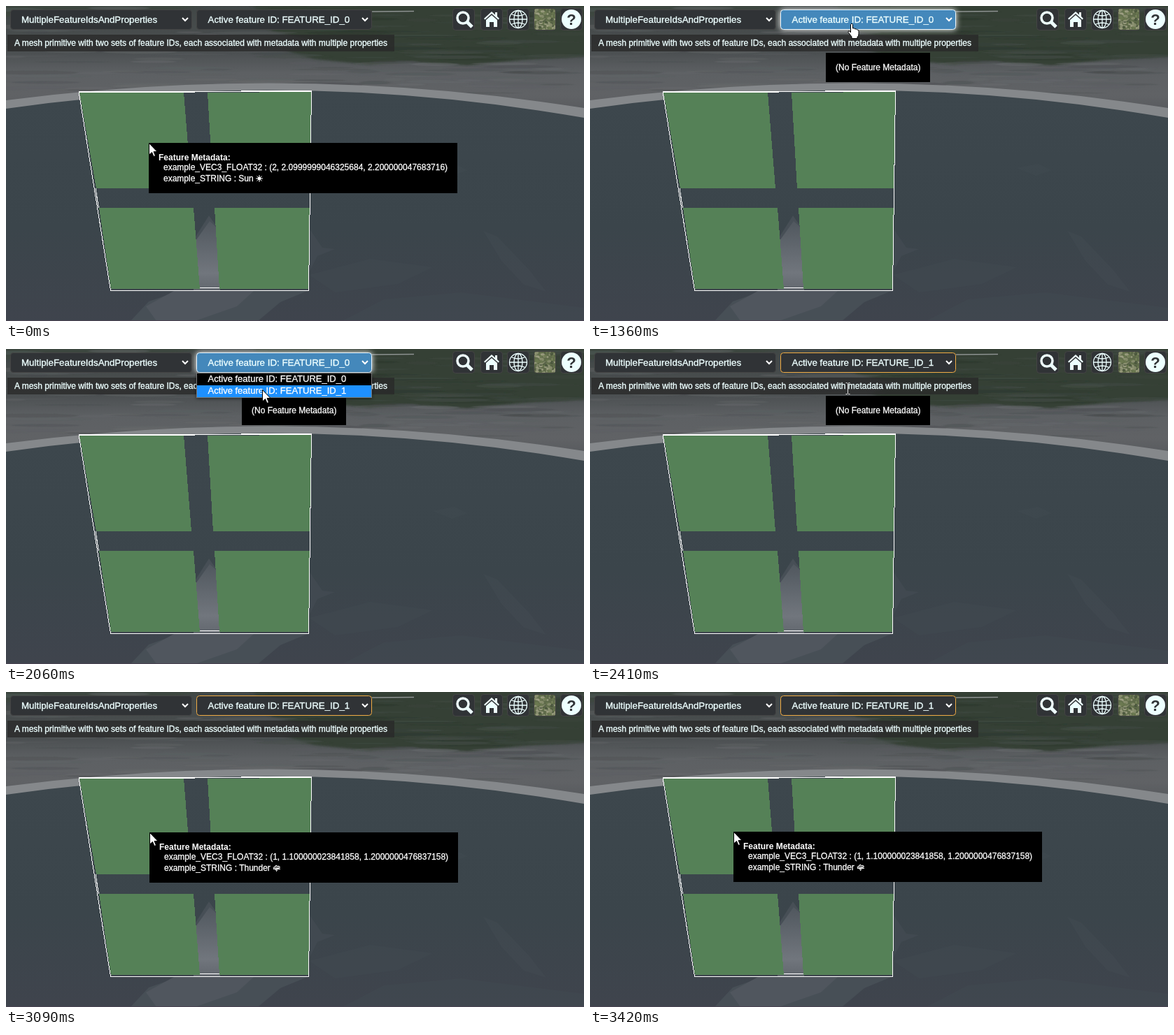
Animation of 826x451 px, one loop 3.77 s. Source, as an HTML page:

```html
<!DOCTYPE html>
<html lang="en">
<head>
<meta charset="utf-8">
<title>Feature metadata picker</title>
<style>
html, body { margin: 0; width: 100%; height: 100%; overflow: hidden; background: #3c464c; }
svg { display: block; }
text { font: 12px "Liberation Sans", Arial, sans-serif; fill: #fff; stroke: #fff; stroke-width: .3; white-space: pre; }
.ui text { stroke: #edffff; stroke-width: .35; fill: #edffff; }
text.bold { font-weight: bold; stroke: none; }
text.select { font-size: 13.333px; }
text.menu { font-size: 13px; }
.button { fill: #303336; stroke: #444; }
.wire { fill: none; stroke: #fff; }
.chevron { fill: none; stroke: #fff; stroke-width: 2; }
#active.hover rect { fill: #48b; stroke: #e8f6ff; filter: drop-shadow(0 0 4px #fff); }
#active.focus rect { stroke: #ea4; }
#cursors path { stroke: #000; fill: #fff; }
</style>
</head>
<body>
<svg width="826" height="451" viewBox="0 0 826 451">
  <defs>
    <linearGradient id="road" x2="0" y2="1">
      <stop offset="0" stop-color="#414746"/>
      <stop offset=".42" stop-color="#4c5052"/>
      <stop offset=".6" stop-color="#5d6063"/>
      <stop offset=".8" stop-color="#606265"/>
      <stop offset="1" stop-color="#54575b"/>
    </linearGradient>
    <linearGradient id="lake" x2="0" y2="1">
      <stop offset="0" stop-color="#3d474d"/>
      <stop offset=".6" stop-color="#3b454b"/>
      <stop offset="1" stop-color="#3f444d"/>
    </linearGradient>
    <linearGradient id="glare" x2="0" y2="1">
      <stop offset="0" stop-color="#50575e"/>
      <stop offset=".45" stop-color="#646a71"/>
      <stop offset=".75" stop-color="#71767d"/>
      <stop offset="1" stop-color="#62676e"/>
    </linearGradient>
    <filter id="soft" x="-20%" y="-50%" width="140%" height="200%"><feGaussianBlur stdDeviation="3 1.5"/></filter>
    <filter id="smear"><feGaussianBlur stdDeviation="2 .6"/></filter>
    <clipPath id="photo"><rect x="755" y="4" width="30" height="30" rx="3"/></clipPath>
  </defs>

  <rect width="826" height="160" fill="url(#road)"/>
  <g filter="url(#soft)">
    <path fill="#343f36" d="M350 -5H840V72L740 77 660 85 580 80 520 84 440 76 400 64 440 50 380 36Z"/>
    <path fill="#3d4640" d="M-9 -5H300L240 7 90 10 -9 16Z"/>
  </g>
  <g id="streaks" filter="url(#smear)"></g>
  <path stroke="#8d9291" stroke-width="1.5" d="M523 8L583 7.500"/>
  <path fill="url(#lake)" d="M0 142Q413 84 826 153V451H0Z"/>
  <path fill="#85888b" d="M0 135Q413 81 826 146V160Q413 88 0 147Z"/>

  <g fill="#444c53">
    <path opacity=".7" d="M433 318L452 346 470 348 445 358 433 382Z"/>
    <path opacity=".4" d="M682 322L702 330 748 378 772 409 740 399 708 365Z"/>
    <path opacity=".3" d="M433 385L520 362 610 374 560 398 470 410ZM480 451L540 420 650 410 826 432V451Z"/>
    <path opacity=".3" d="M610 232L640 226 660 235 637 243Z"/>
  </g>
  <path fill="#474f56" d="M271 330L290 300 304 320 306 407H433L392 424 360 451H178L204 423 250 407H271Z"/>
  <path fill="#50565e" d="M200 430L240 408H354L330 430 270 451H215Z"/>
  <path fill="url(#glare)" d="M271 336L291 308 302 318 306 407H268Z"/>
  <path stroke="#4b4453" d="M0 450.5H826"/>

  <g shape-rendering="crispEdges">
    <path fill="#558157" d="M105 124L254 124 265 261 129 261ZM288 124L436 123 434 261 296 261ZM133 289L268 289 277 405 150 405ZM298 289L434 289 433 405 305 405Z"/>
    <path class="wire" d="M104 122.500L337 122.500M336 121.500H436.500L432.500 407.500H149.500L104 122.500M105 123.500L436 122.500M128 261L132.500 289M277 403.500H305"/>
  </g>

  <g class="ui">
    <rect x="2" y="41" width="553" height="24" fill="#2a2a2a" fill-opacity=".8"/>
    <text x="12" y="57">A mesh primitive with two sets of feature IDs, each associated with metadata with multiple properties</text>
    <rect class="button" x="6.500" y="5.500" width="259" height="28" rx="4"/>
    <text class="select" x="22" y="24">MultipleFeatureIdsAndProperties</text>
    <path class="chevron" d="M252 17l4 4 4-4"/>
    <g id="active">
      <rect class="button" x="272.500" y="5.500" width="250" height="28" rx="4"/>
      <text class="select" id="choice" x="288.500" y="24"></text>
      <path class="chevron" d="M509 17l4 4 4-4"/>
    </g>
  </g>

  <g id="tools"></g>
  <g fill="none" stroke="#edffff">
    <circle cx="653" cy="17" r="8" stroke-width="3.500"/>
    <path stroke-width="5" d="M659 23l7 7"/>
    <g stroke-width="1.300">
      <circle cx="732" cy="19" r="12.500"/>
      <ellipse cx="732" cy="19" rx="6" ry="12.500"/>
      <path d="M732 6.500v25M719.500 19h25M722 11.500q10 5 20 0M722 26.500q10-5 20 0"/>
    </g>
  </g>
  <path fill="#edffff" d="M694 8l5 4.500V9h3v6l3 3-1.500 1.500L694 11l-9.500 8.500L683 18ZM686 20l8-7 8 7v10h-5v-7h-6v7h-5Z"/>
  <g clip-path="url(#photo)">
    <rect x="754" y="3" width="32" height="32" fill="#5f6b4a"/>
    <g id="foliage"></g>
  </g>
  <circle cx="808" cy="19" r="14" fill="#edffff"/>
  <text class="bold" x="808" y="27" text-anchor="middle" style="font-size:22px;fill:#303336">?</text>

  <g id="empty">
    <rect x="337" y="67" width="149" height="42"/>
    <text x="351" y="92">(No Feature Metadata)</text>
  </g>
  <g id="tip">
    <rect width="441" height="72"/>
    <text class="bold" x="14" y="25">Feature Metadata:</text>
    <text x="21" y="39" id="vector"></text>
    <text x="21" y="55" id="label"></text>
    <g id="sun" transform="translate(158 51)" fill="#fff" stroke="#fff">
      <circle r="2"/>
      <path d="M-5 0H5M0-5V5M-3.500-3.500l7 7M3.500-3.500l-7 7"/>
    </g>
    <g id="storm" transform="translate(182 51)" fill="none" stroke="#fff">
      <path fill="#777" d="M-4 1.500q-2-3 1-3 2-4 4-1 4-1 3 2.500Z"/>
      <path d="M-5 1.500H5M0 1l-2 2h3l-2 2"/>
    </g>
  </g>

  <g id="menu" style="filter:drop-shadow(0 1px 2px #0008)">
    <rect x="272.500" y="34.500" width="250" height="35" stroke="#777"/>
    <rect id="row" x="273" width="249" height="17" fill="#1e90ff"/>
    <text class="menu" x="288.500" y="47">Active feature ID: FEATURE_ID_0</text>
    <text class="menu" x="288.500" y="64">Active feature ID: FEATURE_ID_1</text>
  </g>

  <g id="cursors">
    <path id="arrow" d="M.5.500V17L4.500 13.500 7 19.500 9.500 18.500 7 12.500H12Z"/>
    <path id="hand" d="M4.500 14V2.500q1.500-3 3 0V8q2.500-1 3 1 2-1 3 1 2.500-.5 2.500 2v4q0 3-2 4.500V22.500H6V20L1 13.500q0-2.500 2-1.500Z"/>
    <path id="beam" style="fill:none;stroke:#ddd" d="M-3 .5H-1L0 1.500 1 .5H3M0 1V16M-3 16.500H-1L0 15.500 1 16.500H3"/>
  </g>
</svg>
<script>
const $ = id => document.getElementById(id);
const show = (id, on) => $(id).style.display = on ? "" : "none";
const move = (id, x, y) => $(id).setAttribute("transform", `translate(${x} ${y})`);

// Ground texture and foliage from one seeded generator
let seed = 7;
const rand = () => (seed = seed * 16807 % 2147483647) / 2147483647;
const pick = list => list[Math.floor(rand() * list.length)];
const blob = (x, y, rx, ry, fill, opacity) =>
  `<ellipse cx="${x}" cy="${y}" rx="${rx}" ry="${ry}" fill="${fill}" opacity="${opacity}"/>`;
const repeat = (count, make) => Array.from({ length: count }, make).join("");

$("streaks").innerHTML = repeat(220, () => {
  const x = rand() * 826, y = rand() * 130;
  const green = x > 390 && y < 78;
  const shades = green ? ["#29352c", "#3e4841", "#4a5350"] : ["#45494b", "#6c6f71", "#5c6063"];
  return blob(x, y, 15 + rand() * 50, .8 + rand() * 2, pick(shades), .15 + rand() * .25);
});
$("foliage").innerHTML = repeat(90, () =>
  blob(754 + rand() * 32, 3 + rand() * 32, 1 + rand() * 2, 1 + rand() * 2, pick(["#8f9473", "#46533a", "#a3a488", "#6d7b52"]), .8));
$("tools").innerHTML = [638.5, 678.5, 716.5, 754.5, 792.5].map(x =>
  `<rect class="button" x="${x}" y="3.5" width="31" height="31" rx="4"/>`).join("");

const LOOP = 3770;
const vectors = ["(2, 2.0999999046325684, 2.200000047683716)", "(1, 1.100000023841858, 1.2000000476837158)"];
const labels = ["Sun", "Thunder"];
const steps = [
  { at: 0, id: 0, tip: [204, 196], cursor: ["arrow", 204, 196] },
  { at: 1360, id: 0, look: "hover", cursor: ["hand", 368, 24] },
  { at: 1710, id: 0, look: "hover", row: 0, cursor: ["hand", 368, 24] },
  { at: 2060, id: 0, look: "hover", row: 1, cursor: ["arrow", 366, 58] },
  { at: 2410, id: 1, look: "focus", cursor: ["beam", 368.5, 48] },
  { at: 2740, id: 1, look: "focus", tip: [220, 186], cursor: ["arrow", 217, 189] },
  { at: 3090, id: 1, look: "focus", tip: [205, 201], cursor: ["arrow", 205, 201] },
  { at: 3420, id: 1, look: "focus", tip: [205, 200], cursor: ["arrow", 205, 200] }
];

function render({ id, look = "", tip, row, cursor }) {
  $("choice").textContent = "Active feature ID: FEATURE_ID_" + id;
  $("active").setAttribute("class", look);
  show("tip", tip);
  show("empty", !tip);
  if (tip) move("tip", ...tip);
  $("vector").textContent = "example_VEC3_FLOAT32 : " + vectors[id];
  $("label").textContent = "example_STRING : " + labels[id];
  show("sun", id === 0);
  show("storm", id === 1);
  show("menu", row !== undefined);
  $("row").setAttribute("y", 35 + 17 * (row || 0));
  for (const name of ["arrow", "hand", "beam"]) show(name, name === cursor[0]);
  move(...cursor);
}

const start = performance.now();
let current;
function tick() {
  const time = (performance.now() - start) % LOOP;
  const step = steps.findLast(s => s.at <= time);
  if (step !== current) render(current = step);
  requestAnimationFrame(tick);
}
tick();
</script>
</body>
</html>
```
